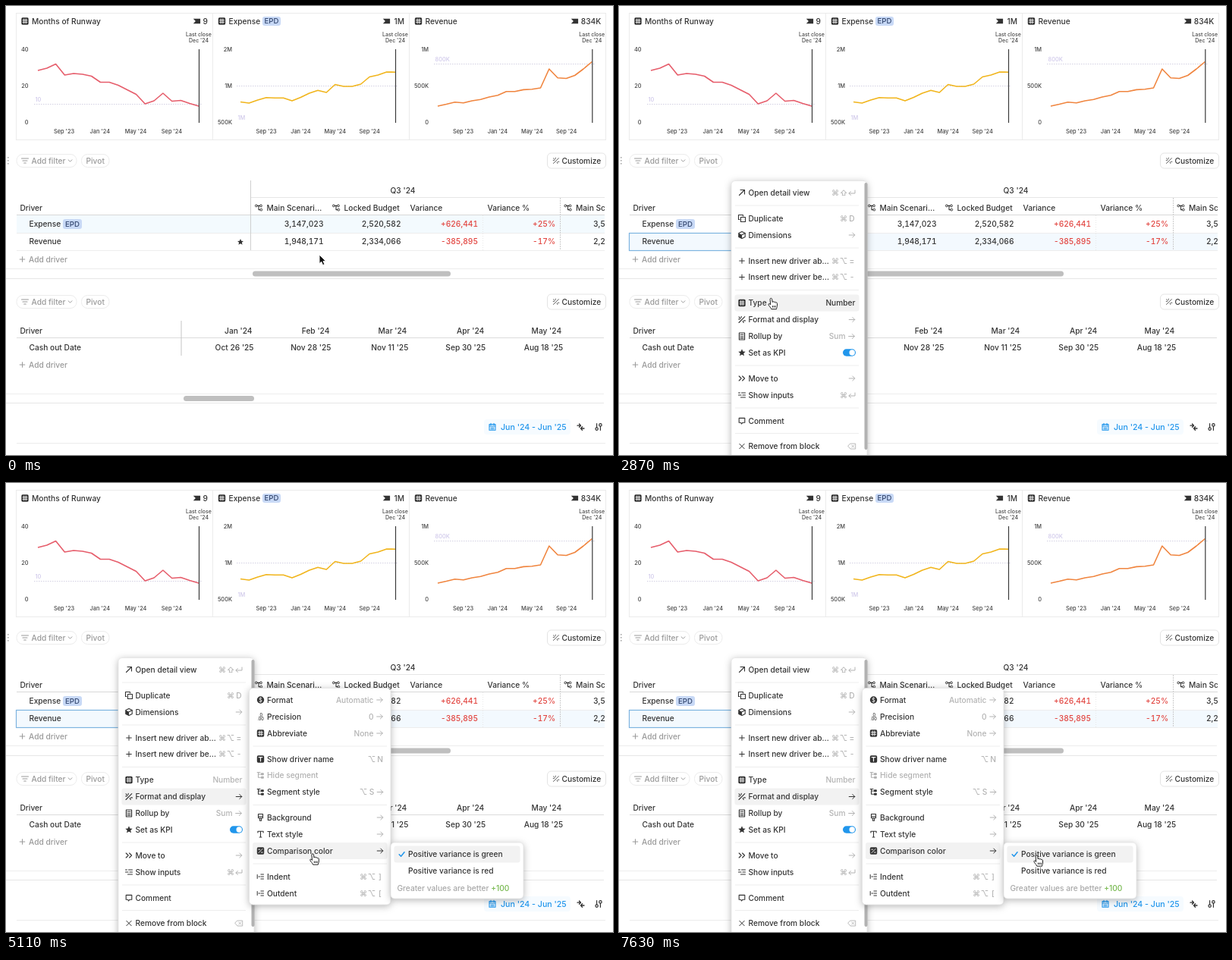
An HTML page for the animation above (8 s loop, 800x592 px).

```html
<!DOCTYPE html>
<html lang="en">
<head>
<meta charset="utf-8">
<title>Variance colors</title>
<style>
html, body { margin: 0; width: 100%; height: 100%; overflow: hidden; background: #fff; }
svg { display: block; width: 800px; height: 592px; color: #333; }
text { font-family: Inter, "DejaVu Sans", sans-serif; font-weight: 500; white-space: pre; }
.num { font-weight: 450; font-variant-numeric: tabular-nums; }
.panel { fill: #fff; stroke: #e4e4e4; stroke-width: .8; filter: drop-shadow(0 2px 5px rgba(0, 0, 0, .28)); }
.hl { fill: none; }
.on .hl { fill: #f2f2f2; }
.key { color: #b3b3b3; }
.on .key { color: #333; }
</style>
</head>
<body>
<svg id="stage" viewBox="0 0 800 592"></svg>
<script>
const INK = '#333', GREY = '#999', RED = '#e2443f', GREEN = '#438a35', BLUE = '#2196ec';
const LOOP = 8000, STEP = 70;
const $ = id => document.getElementById(id);

// drawing helpers: every one returns markup
const text = (x, y, s, { size = 10.2, fill = 'currentColor', anchor = 'start', more = '' } = {}) =>
  `<text x="${x}" y="${(y + size * .364).toFixed(2)}" font-size="${size}" fill="${fill}" text-anchor="${anchor}" ${more}>${s}</text>`;
const rect = (x, y, w, h, fill, r = 0, more = '') =>
  `<rect x="${x}" y="${y}" width="${w}" height="${h}" rx="${r}" fill="${fill}" ${more}/>`;
const line = (x1, y1, x2, y2, stroke = '#e6e6e6', more = '') =>
  `<path d="M${x1} ${y1}L${x2} ${y2}" stroke="${stroke}" fill="none" ${more}/>`;
const num = (x, y, s, fill = INK, more = '') =>
  text(x, y, s, { fill, anchor: 'end', more: 'class="num" ' + more });

const stroke = (d, w = 1.1) =>
  `<path d="${d}" fill="none" stroke="currentColor" stroke-width="${w}" stroke-linecap="round" stroke-linejoin="round"/>`;
const solid = d => `<path d="${d}" fill="currentColor"/>`;
const tile = mark => rect(-4.7, -4.7, 9.4, 9.4, 'currentColor', 1.6) + `<g color="#fff">${mark}</g>`;
const glyph = (s, more = '') => text(0, 0, s, { size: 11, anchor: 'middle', more });

const ICONS = {
  '→': stroke('M-3.8 0H3.8M.8 -3L3.8 0L.8 3', 1),
  '↵': stroke('M4 -3V1H-4M-1.6 -1.4L-4 1L-1.6 3.4', 1),
  '⌫': stroke('M-2 -3.5H4.7V3.5H-2L-5 0ZM-.2 -1.5L2.8 1.5M2.8 -1.5L-.2 1.5', .9),
  out: stroke('M-3.5 3.5L3.5 -3.5M-2 -3.5H3.5V2'),
  copy: stroke('M-1.5 -1.5H4.5V4.5H-1.5ZM-3 1.5H-4.5V-4.5H1.5V-3'),
  cube: stroke('M0 -4.6L4.2 -2.4V2.4L0 4.6L-4.2 2.4V-2.4Z') + solid('M-4.2 -2.4L0 -.2V4.6L-4.2 2.4Z') + stroke('M0 -.2L4.2 -2.4'),
  plus: stroke('M-3.3 0H3.3M0 -3.3V3.3', 1),
  hash: tile(stroke('M-1.3 -3V3M1.3 -3V3M-3 -1.3H3M-3 1.3H3', .9)),
  wand: stroke('M-4 4L3.8 -3.8M-4 -3.6L-1.8 -1.6M-4.2 -.6H-2.8M-.8 -4.3V-2.8M1.2 2L2.2 4M2.6 1.4H4.4'),
  calc: stroke('M-3.6 -4.5H3.6V4.5H-3.6ZM-2 -2.3H2M-2 .3H2M-2 2.4H2'),
  star: solid('M0 -4.7L1.4 -1.6L4.7 -1.3L2.2 1L3 4.3L0 2.5L-3 4.3L-2.2 1L-4.7 -1.3L-1.4 -1.6Z'),
  next: stroke('M-3.8 -3L-.8 0L-3.8 3M.6 -3L3.6 0L.6 3'),
  inputs: stroke('M-4.5 -3H-2.5M-.5 -3H4.5M-4.5 0H-1M1 0H4.5M-1.5 3H4.5'),
  note: stroke('M-3.8 -3.6H3.8V2.2H1L-.4 4L-1.4 2.2H-3.8Z'),
  x: stroke('M-3.2 -3.2L3.2 3.2M3.2 -3.2L-3.2 3.2', 1),
  coin: '<circle r="4.7" fill="currentColor"/>' + text(0, 0, '$', { size: 7.5, fill: '#fff', anchor: 'middle' }),
  digits: text(0, -2, '.0', { size: 5.5, anchor: 'middle' }) + text(0, 2.6, '.00', { size: 5.5, anchor: 'middle' }),
  name: tile(stroke('M-2.4 -2.4H2.4M0 -2.4V2.8', 1.2)),
  tree: stroke('M-3 -4V2.7H0M-3 -1.5H0M-4.3 -4H-.5') + rect(.5, -3.2, 3.8, 3, 'currentColor', .8) + rect(.5, 1.2, 3.8, 3, 'currentColor', .8),
  brush: stroke('M-3 -4.5H3V.8H-3ZM-3 -1.2H3M-1 1V4.3H1V1'),
  type: stroke('M-3.6 -2V-3.8H3.6V-2M0 -3.8V4M-1.4 4H1.4'),
  diff: tile(stroke('M-2.6 2.6L2.6 -2.6M-2.8 -1.8H-.8M.8 2H2.8', .9)),
  indent: stroke('M-4.3 -2.5V2.5M-2.6 0H-1M.4 -3H4M.4 0H4M.4 3H4', 1),
  bold: glyph('B', 'style="font-weight:700"'),
  italic: glyph('I', 'font-style="italic"'),
  strike: glyph('S') + stroke('M-4.2 0H4.2'),
  check: stroke('M-3.3 .2L-.9 2.8L3.5 -2.8', 1.5),
  flag: solid('M-4.7 -3.2H4.6V3.2H-4.7L-1.6 0Z'),
  filter: stroke('M-4.5 -3H4.5M-3 0H3M-1.3 3H1.3', 1.1),
  down: stroke('M-2.4 -1.2L0 1.2L2.4 -1.2', 1),
  link: stroke('M-1.8 -2.6H0V2.6H1.8M0 -2.6H1.5') + '<g fill="none" stroke="currentColor"><circle cx="-3.2" cy="-2.6" r="1.4"/><circle cx="3" cy="-2.6" r="1.4"/><circle cx="3.3" cy="2.6" r="1.4"/></g>',
  cal: stroke('M-4 -3.4H4V4.2H-4ZM-4 -1H4M-2 -4.6V-2.6M2 -4.6V-2.6M-2 1H2M-2 2.8H2'),
  merge: stroke('M-4.5 -1.8H-.2M-2 -4L0 -1.8L-2 .2M4.5 2H.2M2 -.2L0 2L2 4.2', 1.3),
  tune: stroke('M-2.4 -4.3V.6M2.4 4.3V-.6', 1.2) + '<g fill="none" stroke="currentColor" stroke-width="1.2"><circle cx="-2.4" cy="2.6" r="1.7"/><circle cx="2.4" cy="-2.6" r="1.7"/></g>'
};
const icon = (name, x, y, color = '', scale = 1) =>
  `<g transform="translate(${x} ${y}) scale(${scale})" ${color && `color="${color}"`}>${ICONS[name]}</g>`;

function pill(x, y, w, h) {
  return rect(x, y - h / 2, w, h, '#c8d9f6', 3) + text(x + w / 2, y, 'EPD', { size: 9.6, fill: '#33476f', anchor: 'middle' });
}

function chart({ x, title, value, color, x0, x1, ys, axis, axisX, months, goal, goalY, labelY, flagX, id }) {
  const small = { size: 7.4, fill: '#444' };
  const pts = ys.map((y, i) => `${(x0 + (x1 - x0) * i / (ys.length - 1)).toFixed(1)},${y}`).join(' ');
  return icon('hash', x + 5, 20) + text(x + 14, 20, title) +
    icon('flag', flagX, 20) + text(x1 + 12, 20, value, { anchor: 'end' }) +
    text(x1, 37, 'Last close', { size: 7, fill: '#444', anchor: 'middle' }) +
    text(x1, 45.3, "Dec '24", { size: 7, fill: '#444', anchor: 'middle' }) +
    axis.map((s, i) => text(axisX, 57 + 48 * i, s, { ...small, anchor: 'end' })).join('') +
    ["Sep '23", "Jan '24", "May '24", "Sep '24"].map((s, i) =>
      text(months[0] + months[1] * i, 165, s, { ...small, anchor: 'middle' })).join('') +
    line(x0 - 5, goalY, x1 + 4, goalY, '#d3d0e2', 'stroke-dasharray="1.5 1.5"') +
    text(x0 - 3.5, labelY, goal, { size: 7.4, fill: '#cfc8ea', more: `id="${id}"` }) +
    `<polyline points="${pts}" fill="none" stroke="${color}" stroke-width="1.6" stroke-linejoin="round"/>` +
    line(x1 + .5, 57, x1 + .5, 154, '#3a3a3a', 'stroke-width="1.2"');
}

function toolbar(y) {
  return rect(14, y - 8.5, 79, 17, '#fff', 8, 'stroke="#ececec"') + icon('filter', 25, y, GREY) +
    text(33.5, y, 'Add filter', { fill: GREY }) + icon('down', 84.5, y, GREY) +
    rect(99.5, y - 8.5, 36.5, 17, '#fff', 8, 'stroke="#ececec"') + text(105.5, y, 'Pivot', { fill: GREY }) +
    rect(713.5, y - 10, 77, 20, '#fff', 5, 'stroke="#e4e4e4"') + icon('wand', 725, y, '#666', .9) +
    text(732.5, y, 'Customize');
}
const addDriver = y => icon('plus', 21.5, y, GREY) + text(30, y, 'Add driver', { fill: GREY });

function tables() {
  const scenario = (x, s) => icon('link', x + 5, 266) + text(x + 15.5, 266, s);
  const row = (y, cells, more) => num(418.5, y, cells[0]) + num(520.5, y, cells[1]) +
    num(622, y, cells[2], RED, more) + num(724, y, cells[3], RED, more) + text(774, y, cells[4], { more: 'class="num"' });
  const months = [["Jan '24", "Oct 26 '25"], ["Feb '24", "Nov 28 '25"], ["Mar '24", "Nov 11 '25"],
    ["Apr '24", "Sep 30 '25"], ["May '24", "Aug 18 '25"]];
  return toolbar(204) + toolbar(390) +
    [0, 1, 2].map(i => rect(2, 199 + 4 * i, 1.6, 1.6, '#aaa')).join('') +
    '<g clip-path="url(#edge)">' +
    rect(14, 276, 776, 23, '#f3fafe', 0, 'id="hoverA"') + rect(14, 299, 776, 23, '#f3f9fe', 0, 'id="hoverB"') +
    text(523, 243.5, "Q3 '24", { anchor: 'middle' }) + line(323, 252.5, 789, 252.5) +
    text(18.5, 266, 'Driver') + scenario(328, 'Main Scenari…') + scenario(430, 'Locked Budget') +
    text(532.5, 266, 'Variance') + text(634.5, 266, 'Variance %') + scenario(735.5, 'Main Scenari…') +
    line(14, 275.5, 789, 275.5, '#d8d8d8') + line(14, 299.5, 789, 299.5, '#ededed') + line(14, 322.5, 789, 322.5, '#ededed') +
    line(322.5, 230, 322.5, 322, '#cfcfcf') + line(730.5, 253, 730.5, 322, '#ccc', 'stroke-dasharray="2 1"') +
    line(628.5, 276, 628.5, 322, '#e8e8e8', 'stroke-dasharray="1 2"') +
    text(30.5, 287.5, 'Expense') + pill(75, 287.5, 25, 13) + text(30.5, 310.5, 'Revenue') + icon('star', 309, 311, '', .85) +
    row(287.5, ['3,147,023', '2,520,582', '+626,441', '+25%', '3,537,210'], '') +
    row(310.5, ['1,948,171', '2,334,066', '-385,895', '-17%', '2,214,480'], 'data-rev="1"') + '</g>' +
    addDriver(334) + line(0, 346.5, 788, 346.5, '#ededed') + rect(325, 349.5, 261, 7, '#bfbfbf', 3.5) + line(0, 359.5, 788, 359.5) +
    text(18.5, 428.5, 'Driver') + line(14, 437.5, 788, 437.5, '#dcdcdc') + line(231, 415, 231, 461, '#c4c4c4') +
    text(30.5, 450, 'Cash out Date') +
    months.map(([m, d], i) => text(324.5 + 101.9 * i, 428.5, m, { anchor: 'end' }) +
      text(326.5 + 101.9 * i, 450, d, { anchor: 'end' })).join('') +
    addDriver(473) + line(0, 511.5, 788, 511.5, '#ededed') + rect(234, 514, 93, 7, '#bfbfbf', 3.5) + line(0, 523.5, 788, 523.5) +
    rect(630, 545, 114, 20, '#f6fbff', 4) + icon('cal', 641, 555, BLUE) +
    text(652, 554.7, "Jun '24 - Jun '25", { size: 10.6, fill: BLUE }) +
    icon('merge', 757.5, 555) + icon('tune', 781, 555) + line(14, 576.5, 790, 576.5, '#ececec');
}

// right side of a menu row: a value, shortcut keys, or either with an arrow
function rightSide(s, xr, y) {
  if (/^\w/.test(s)) {
    const arrow = s.endsWith('→');
    return text(xr - (arrow ? 13 : 0), y, s.replace('→', ''), { anchor: 'end' }) + (arrow ? icon('→', xr - 5, y) : '');
  }
  return [...s].reverse().map((c, i) => {
    const x = xr - 4.5 - 11 * i;
    return ICONS[c] ? icon(c, x, y) : text(x, y, c, { anchor: 'middle' });
  }).join('');
}

function menu(id, [x, y, w, h], tx, xr, rows, seps = []) {
  const body = rows.map(([name, ry, ic, label, right = '']) =>
    `<g id="${name}">` + rect(x + 4.5, ry - 11, w - (id === 'main' ? 15 : 9), 22, '', 3, 'class="hl"').replace('fill=""', '') +
    `<g ${name === 'hide' ? 'color="#b0b0b0"' : ''}>` +
    (ic ? icon(ic, tx - 8.5, ry, ic === 'check' ? BLUE : '') : '') + text(tx, ry, label) + '</g>' +
    `<g class="key">${rightSide(right, xr, ry)}</g></g>`).join('');
  return `<g id="${id}">` + rect(x, y, w, h, '#fff', 5, 'class="panel"') +
    seps.map(s => line(x + 5, s, x + w - (id === 'main' ? 11 : 5), s, '#ededed')).join('') + body;
}

const MAIN = [
  ['open', 246, 'out', 'Open detail view', '⌘⇧↵'], ['dup', 280, 'copy', 'Duplicate', '⌘D'],
  ['dims', 302, 'cube', 'Dimensions', '→'], ['above', 336, 'plus', 'Insert new driver ab…', '⌘⌥='],
  ['below', 357.5, 'plus', 'Insert new driver be…', '⌘⌥-'], ['kind', 391.5, 'hash', 'Type', 'Number'],
  ['format', 413.5, 'wand', 'Format and display', '→'], ['roll', 435.5, 'calc', 'Rollup by', 'Sum→'],
  ['kpi', 457, 'star', 'Set as KPI'], ['move', 491, 'next', 'Move to', '→'], ['show', 513, 'inputs', 'Show inputs', '⌘↵'],
  ['comment', 547, 'note', 'Comment'], ['remove', 580.5, 'x', 'Remove from block', '⌫']];
const DISPLAY = [
  ['fmt', 286, 'coin', 'Format', 'Automatic→'], ['prec', 308, 'digits', 'Precision', '0→'],
  ['abbr', 330, 'hash', 'Abbreviate', 'None→'], ['names', 364, 'name', 'Show driver name', '⌥N'],
  ['hide', 385.5, 'tree', 'Hide segment'], ['seg', 407.5, 'tree', 'Segment style', '⌥S→'],
  ['back', 441, 'brush', 'Background', '→'], ['style', 463, 'type', 'Text style', '→'],
  ['compare', 485, 'diff', 'Comparison color', '→'], ['indent', 519, 'indent', 'Indent', '⌘⌥]'],
  ['outdent', 541, 'indent', 'Outdent', '⌘⌥[']];
const STYLE = [['bold', 467.5, 'bold', 'Bold', '⌘B'], ['italic', 489.5, 'italic', 'Italic', '⌘I'],
  ['strike', 511.5, 'strike', 'Strike', '⌘⇧S']];
const COLOR = [['green', 489.5, '', 'Positive variance is green'], ['red', 511.5, '', 'Positive variance is red']];

const better = (id, word, color) =>
  text(515.5, 534, `${word} values are better <tspan fill="${color}">+100</tspan>`, { fill: '#a8a8a8', more: `id="${id}"` });

$('stage').innerHTML = '<clipPath id="edge"><rect width="789" height="592"/></clipPath>' +
  '<path d="M13 9.5H791M13 176.5H791M13.5 9V176M272.5 9V176M531.5 9V176M790.5 9V176" stroke="#ebebeb" fill="none"/>' +
  chart({ x: 20, title: 'Months of Runway', value: '9', color: '#e65d6b', x0: 42, x1: 254, axis: ['40', '20', '0'], axisX: 29.5,
    months: [76.5, 47.3], goal: '10', goalY: 129.5, labelY: 123, flagX: 251.5, id: 'goal1',
    ys: [85, 82, 76.5, 91, 89, 90, 92.5, 100.5, 100.5, 104.5, 110.5, 116.5, 129, 125, 115, 125.5, 124.5, 128.5, 132] }) +
  chart({ x: 279.5, title: 'Expense', value: '1M', color: '#f1b51c', x0: 309, x1: 513, axis: ['2M', '1M', '500K'], axisX: 298,
    months: [343, 45.4], goal: '1M', goalY: 105.5, labelY: 147, flagX: 501.5, id: 'goal2',
    ys: [126.5, 128, 124, 120.8, 121.2, 121.3, 125, 120.5, 115, 111.3, 114, 103.5, 106, 106, 103, 93.5, 91, 87, 87.2] }) +
  pill(338, 20, 24, 12) +
  chart({ x: 538.5, title: 'Revenue', value: '834K', color: '#f0853f', x0: 569, x1: 772.3, axis: ['1M', '500K', '0'], axisX: 557,
    months: [602.5, 45.4], goal: '800K', goalY: 76.5, labelY: 70, flagX: 749.5, id: 'goal3',
    ys: [132, 129.5, 126.7, 127.8, 125, 123.3, 120, 117.7, 112.8, 112.8, 110.4, 109.8, 108, 83, 94.8, 95.5, 91.5, 83, 73.5] }) +
  tables() +
  rect(13.5, 299.5, 308, 23, 'none', 0, 'id="select" stroke="#7db4e0" stroke-width="1.2"') +
  menu('main', [148, 230.5, 179, 380], 170.5, 311.5, MAIN, [263, 319, 374.5, 474, 530, 563.5]) +
  rect(323.5, 233, 4, 352, '#b2b2b2', 2) + rect(295, 452.3, 17, 9.4, BLUE, 4.7) + '<circle cx="307.2" cy="457" r="3.7" fill="#fff"/></g>' +
  menu('display', [320.5, 270.5, 186.5, 285.5], 344, 497.5, DISPLAY, [347, 424.5, 502]) + '</g>' +
  menu('styles', [507, 453, 131, 73], 530, 629.5, STYLE) + '</g>' +
  menu('colors', [507, 474, 175, 74], 530, 672, COLOR) +
  `<g id="tick">${icon('check', 521.5, 0, BLUE)}</g>` + better('more', 'Greater', '#76b84e') + better('less', 'Lesser', '#e5534e') + '</g>' +
  '<g id="tip">' + rect(300, 301, 84, 20, '#555', 4) + text(305.5, 311, 'value', { size: 9.6, fill: '#fff' }) +
  rect(333, 304.5, 47, 13, '#f7d7d8', 3) + text(336, 311, 'Revenue:', { size: 9.4, fill: '#b06a6a' }) + '</g>' +
  '<circle id="ring" fill="#fff" fill-opacity=".35" stroke="#a8bee9" stroke-width="3"/>' +
  '<g id="cursor"><path id="arrow" d="M0 0V11.6L2.7 9.2L4.6 13.6L6.9 12.6L5 8.4H8.4Z" fill="#111" stroke="#fff" stroke-width=".9"/>' +
  '<path id="hand" d="M-1.4 1.2C-1.4 -.6 1 -.6 1.2 1.1L1.7 5C2 3.7 3.8 3.8 3.9 5.2C4.4 4.2 6 4.5 6.1 5.8C6.7 5 8 5.5 8 6.8V10C8 11.6 7.2 12 7 14.2H.3C0 12.6 -2.4 10.6 -3.4 8.6C-4.1 7.2 -2.5 6.4 -1.5 7.6L-.8 8.4ZM2 9.6V12M3.9 9.6V12M5.8 9.6V12" fill="#fff" stroke="#222" stroke-width="1" stroke-linejoin="round"/></g>';

// time, x, y of the pointer
const PATH = [[0, 413, 328], [70, 413, 328], [280, 392, 320], [630, 392, 320], [840, 318, 315], [1050, 190, 311], [1260, 132.3, 311.5],
  [2380, 132.3, 311.5], [2590, 162, 345], [2870, 200.5, 385.5], [3150, 230, 412], [3990, 236, 412], [4130, 345, 462], [4200, 381, 488],
  [4410, 402, 489], [4620, 402, 489], [4830, 404.3, 489], [5110, 404.3, 489], [5320, 475, 497], [5600, 541.5, 512],
  [6580, 541.5, 512], [6860, 550.5, 491]];
const CLICKS = [1680, 5740, 6860];

function pointer(t) {
  const i = PATH.findIndex(p => p[0] > t);
  if (i < 0) return PATH[PATH.length - 1].slice(1);
  const [ta, xa, ya] = PATH[i - 1], [tb, xb, yb] = PATH[i], k = (t - ta) / (tb - ta);
  return [xa + (xb - xa) * k, ya + (yb - ya) * k];
}
const show = (id, yes) => { $(id).style.display = yes ? '' : 'none'; };
const mark = (id, yes) => $(id).classList.toggle('on', yes);

function draw(time) {
  const t = Math.floor(time % LOOP / STEP) * STEP;
  const [x, y] = pointer(t);
  const opened = t >= 1750, inMenu = opened && x > 148;
  const flipped = t >= 5880 && t < 7000;

  $('cursor').setAttribute('transform', `translate(${x.toFixed(1)} ${y.toFixed(1)})`);
  show('arrow', !inMenu);
  show('hand', inMenu);
  show('hoverA', t < 210);
  show('hoverB', t >= 210);
  show('select', t >= 1680);
  show('main', opened);
  show('display', t >= 3220);
  show('styles', t >= 4130 && t < 4270);
  show('colors', t >= 4270);

  MAIN.forEach(([id, ry]) => mark(id, t >= 3220 ? id === 'format' : inMenu && Math.abs(y - ry) < 11));
  mark('style', t >= 4130 && t < 4270);
  mark('compare', t >= 4270);
  mark('bold', true);
  const overRed = x > 507 && y > 500.5;
  mark('red', overRed);
  mark('green', !overRed);

  $('tick').setAttribute('transform', `translate(0 ${flipped ? 511.5 : 489.5})`);
  show('more', !flipped);
  show('less', flipped);
  document.querySelectorAll('[data-rev]').forEach(e => e.setAttribute('fill', flipped ? GREEN : RED));
  $('goal3').setAttribute('y', flipped ? 149.7 : 72.7);

  show('tip', t >= 1680 && t < 1960);
  $('tip').style.opacity = t <= 1750 ? .85 : .85 * (1 - (t - 1750) / 210);

  const click = CLICKS.find(c => t >= c && t < c + 490);
  show('ring', click !== undefined);
  if (click !== undefined) {
    const p = (t - click) / 490, ring = $('ring');
    ring.setAttribute('cx', x);
    ring.setAttribute('cy', y);
    ring.setAttribute('r', 17.5 + 6 * p);
    ring.style.opacity = 1 - p * p;
  }
}

const start = performance.now();
function tick() {
  draw(performance.now() - start);
  requestAnimationFrame(tick);
}
tick();
</script>
</body>
</html>
```
